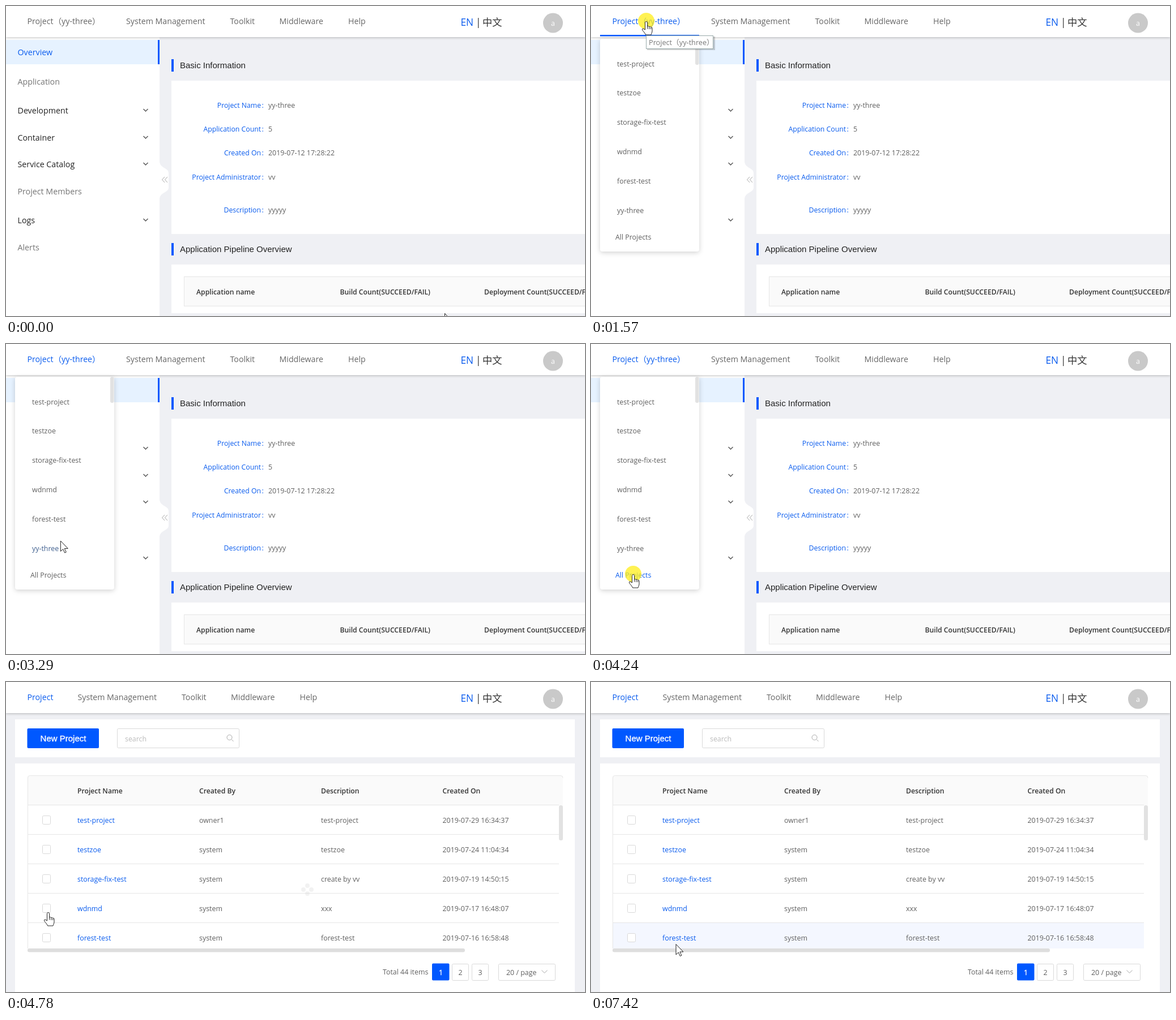
Recreate the animation shown at these times as an HTML page. Size 1022 px wide and 548 px high, loop 7520 ms.

```html
<!DOCTYPE html>
<html lang="en">
<head>
<meta charset="utf-8">
<title>Project console</title>
<style>
html, body { margin: 0; width: 100%; height: 100%; overflow: hidden; background: #eff0f4; }
svg { display: block; width: 1022px; height: 548px; }
text { font: 12.4px "Open Sans", "Noto Sans CJK SC", "Noto Sans CJK", sans-serif; fill: #606060; white-space: pre; }
.nav { font-size: 14.2px; fill: #666; }
.side { font-size: 14.25px; fill: #222; }
.side.dim { fill: #757575; }
.title { font: 15px "Liberation Sans", Arial, sans-serif; fill: #222; }
.label { font-size: 12.25px; text-anchor: end; }
.head { font-size: 12.2px; font-weight: 600; fill: #333; }
.lang { font-size: 17.3px; fill: #333; }
.tip { font-size: 12.7px; fill: #777; }
.mid { text-anchor: middle; }
text.soft { fill: #bbb; }
text.white { fill: #fff; }
text.strong { stroke: #fff; stroke-width: .35; }
text.blue { fill: #0a5cee; }
text.warm { fill: #40608f; }
.line { fill: none; stroke: #e6e6e6; }
.icon { fill: none; stroke: #555; stroke-width: 1.4; }
.thin { fill: none; stroke: #aaa; }
.box { fill: #fff; stroke: #d9d9d9; }
#header { filter: drop-shadow(0 1px 2px rgba(0, 0, 0, .25)); }
#menu { filter: drop-shadow(0 2px 4px rgba(0, 0, 0, .18)); }
</style>
</head>
<body>
<svg id="stage" viewBox="0 0 1022 548"></svg>
<script>
const LOOP = 7520;
const BLUE = '#0058ff';

const text = (x, y, str, cls = '', id = '') =>
  `<text x="${x}" y="${y}" class="${cls}"${id && ` id="${id}"`}>${str}</text>`;
const rect = (x, y, w, h, fill, more = '') =>
  `<rect x="${x}" y="${y}" width="${w}" height="${h}" fill="${fill}" ${more}/>`;
const box = (x, y, w, h, r = 2) =>
  `<rect x="${x + .5}" y="${y + .5}" width="${w - 1}" height="${h - 1}" rx="${r}" class="box"/>`;
const path = (d, cls, more = '') => `<path d="${d}" class="${cls}" ${more}/>`;
const group = (id, ...parts) => `<g id="${id}">${parts.join('')}</g>`;

const projects = ['test-project', 'testzoe', 'storage-fix-test', 'wdnmd', 'forest-test'];

function overviewPage() {
  const sideItems = [
    ['Overview', 87, 'blue'], ['Application', 139, 'dim'], ['Development', 190], ['Container', 238],
    ['Service Catalog', 285], ['Project Members', 333, 'dim'], ['Logs', 384], ['Alerts', 432, 'dim']
  ];
  const fields = [
    ['Project Name', 'yy-three', 180], ['Application Count', '5', 222], ['Created On', '2019-07-12 17:28:22', 264],
    ['Project Administrator', 'vv', 307], ['Description', 'yyyyy', 365]
  ];
  const section = (y, name) => rect(292, y, 4, 22, BLUE) + text(307, y + 15.5, name, 'title');
  return group('overview',
    rect(0, 55, 271, 493, '#fff'),
    path('M271 275c1 12 16 11 16 20v26c0 9 -15 8 -16 20z', '', 'fill="#fff"'),
    path('M280 302l-4.5 5 4.5 5M285 302l-4.5 5 4.5 5', 'thin'),
    rect(0, 60, 268, 43, '#e6f2ff'), rect(268, 60, 3, 43, BLUE),
    ...sideItems.map(([name, y, cls = '']) =>
      text(20.5, y, name, 'side ' + cls, name) +
      (cls ? '' : path(`M242.5 ${y - 8}l4 4 4-4`, 'icon'))),
    section(94, 'Basic Information'), section(419, 'Application Pipeline Overview'),
    rect(292, 132, 730, 271, '#fff'), rect(292, 457, 730, 86, '#fff'),
    ...fields.map(([name, value, y]) =>
      text(450, y, name, 'label blue') + text(451.5, y, ':', 'blue') + text(463, y, value)),
    rect(314.5, 478.5, 720, 52, '#fafafa', 'stroke="#e6e6e6"'),
    text(336, 510, 'Application name', 'head'),
    text(589.5, 510, 'Build Count(SUCCEED/FAIL)', 'head'),
    text(844, 510, 'Deployment Count(SUCCEED/FAIL)', 'head'));
}

function listPage() {
  const columns = [126, 341, 556, 770.5];
  const details = [
    ['owner1', 'test-project', '2019-07-29 16:34:37'], ['system', 'testzoe', '2019-07-24 11:04:34'],
    ['system', 'create by vv', '2019-07-19 14:50:15'], ['system', 'xxx', '2019-07-17 16:48:07'],
    ['system', 'forest-test', '2019-07-16 16:58:48']
  ];
  const dots = [[0, -7], [7, 0], [0, 7], [-7, 0]]
    .map(([x, y]) => `<circle cx="${532 + x}" cy="${367 + y}" r="4" fill="#ccc"/>`);
  const rows = details.map((cells, i) => {
    const y = 218 + 52 * i;
    return rect(39, y, 937, i < 4 ? 51 : 53, '#f4f7ff', 'class="hover"') +
      (i < 4 ? path(`M38 ${y + 51.5}H976`, 'line') : '') + box(64, y + 18, 15, 16) +
      [projects[i], ...cells].map((c, j) => text(columns[j], y + 30.5, c, j ? '' : 'blue')).join('');
  });
  return group('list',
    rect(16, 66, 988, 67, '#fff'), rect(16, 144, 988, 404, '#fff'),
    rect(37.5, 82, 126.5, 35, BLUE, 'rx="2"'), text(101, 105, 'New Project', 'title white strong mid'),
    box(196, 82, 216, 35), text(210, 105, 'search', 'soft'),
    path('M399 98a4.5 4.5 0 1 0 -9 0a4.5 4.5 0 1 0 9 0M398 101.5l3.5 3.5', 'thin'),
    rect(38, 166, 945, 52, '#fafafa'),
    path('M38.5 471V170q0-4.5 4-4.5H979q4 0 4 4M38 217.5H976', 'line'),
    ...['Project Name', 'Created By', 'Description', 'Created On'].map((h, i) => text(columns[i], 196.5, h, 'head')),
    group('rows', ...rows,
      rect(16, 471, 988, 77, '#fff'),
      rect(38, 471, 772, 6.5, '#dedede', 'rx="3"'), rect(976, 218, 7, 62, '#e2e2e2', 'rx="3"'),
      text(665, 516.5, 'Total 44 items'),
      rect(752, 497.5, 30.5, 30, BLUE, 'rx="2"'), text(767.5, 517.5, '1', 'white strong mid'),
      box(787, 498, 30, 30), text(802, 517.5, '2', 'mid'),
      box(822, 498, 30, 30), text(837, 517.5, '3', 'mid'),
      box(869, 498, 101, 30), text(883, 518, '20 / page'),
      path('M945.5 509.5l5 5 5-5', 'thin')),
    group('spinner', ...dots));
}

function header() {
  const items = [['System Management', 212], ['Toolkit', 395.5], ['Middleware', 482.5], ['Help', 604]];
  return group('header', rect(0, -5, 1022, 60, '#fff')) +
    text(37.5, 32, 'Project', 'nav', 'project') + text(83.9, 32, '（yy-three）', 'nav', 'current') +
    group('navRest', ...items.map(([name, x]) => text(x, 32, name, 'nav'))) +
    rect(16, 51, 175, 2.5, BLUE, 'id="underline"') +
    text(802.5, 34.5, 'EN', 'lang blue') + text(829, 34.5, '|', 'lang') + text(841, 35, '中文', 'lang') +
    '<circle cx="965.5" cy="30" r="17.5" fill="#c9c9c9"/>' + text(965.5, 35, 'a', 'white mid');
}

const menu = () => group('menu',
  rect(16, 58, 175, 376, '#fff', 'rx="4"'), rect(184, 58, 6.5, 46, '#e2e2e2', 'rx="3"'),
  ...[...projects, 'yy-three'].map((p, i) => text(46, 106.5 + 51.8 * i, p, 'item')),
  text(43, 413, 'All Projects', '', 'all'));

const overlays = () =>
  group('tooltip', rect(99, 54, 120, 24, '#000', 'opacity=".18"'),
    rect(97.5, 52.5, 118, 23, '#fff', 'stroke="#9aa"'), text(102, 68.5, 'Project（yy-three）', 'tip')) +
  '<circle id="click" r="14.5" fill="#ffee1a"/>' +
  '<g id="cursor" fill="#fff" stroke="#222" stroke-linejoin="round">' +
  path('M.5 .5V19l4.3-4 3 6.6 2.6-1.2-3-6.4h6z', '', 'id="arrow"') +
  path('M-2 15V2.5a2 2 0 0 1 4 0V9.5c.6-1.2 3-1.2 3.2.4c.7-1 2.8-.8 3 .7c.8-.7 2.3-.2 2.3 1.4V17c0 3-1.5 4.5-2 7H-1c-.4-2.4-4-5.5-5.8-8.6c-1-2 1-3.2 2.4-2zM2 9.5v4M5.2 10v4M8.2 11v3', '', 'id="hand"') +
  '</g>';

const $ = id => document.getElementById(id);
$('stage').innerHTML = overviewPage() + listPage() + header() + menu() + overlays();
const menuItems = document.querySelectorAll('.item');
const rowHovers = document.querySelectorAll('.hover');

// Each move: start, end, steps, control point, end point.
const moves = [
  [70, 770, 10, 380, 262, 110, 58],
  [850, 1240, 6, 103, 38, 97.5, 27],
  [2170, 2880, 10, 141, 199, 117, 283],
  [2970, 3680, 10, 96, 350, 74.5, 407],
  [5250, 5710, 7, 118, 312, 142, 228],
  [5880, 6570, 10, 149, 295, 150, 362],
  [6640, 7200, 8, 150, 412, 149.5, 463]
];

function cursorAt(t) {
  let pos = [774, 543];
  for (const [start, end, steps, cx, cy, x, y] of moves) {
    if (t < start) break;
    const step = Math.floor((t - start) / (end - start) * (steps - 1) + .08) + 1;
    const p = Math.min(1, step / steps), q = 1 - p;
    const mix = (a, c, b) => q * q * a + 2 * q * p * c + p * p * b;
    pos = [mix(pos[0], cx, x), mix(pos[1], cy, y)];
  }
  return pos;
}

const show = (el, value) => { el.style.opacity = +value; };
const within = (t, a, b) => t >= a && t < b;
const ramp = (t, a, b) => Math.max(0, Math.min(1, (t - a) / (b - a)));

function draw(t) {
  const [x, y] = cursorAt(t);
  const onList = t >= 4550;
  const menuOpen = within(t, 930, 4550);

  $('overview').style.display = onList ? 'none' : '';
  $('list').style.display = onList ? '' : 'none';
  $('current').style.display = onList ? 'none' : '';
  $('navRest').setAttribute('transform', `translate(${onList ? -85.5 : 0})`);
  $('project').classList.toggle('blue', t >= 850);
  $('current').classList.toggle('blue', t >= 850);
  $('Application').classList.toggle('blue', within(t, 610, 770));

  show($('underline'), within(t, 850, 2250));
  show($('menu'), menuOpen ? ramp(t, 930, 1150) * (1 - ramp(t, 4470, 4560)) : 0);
  show($('tooltip'), within(t, 1570, 1710));
  show($('click'), within(t, 1470, 1710) || within(t, 4240, 4470) ? .75 : 0);
  $('click').setAttribute('transform', `translate(${x} ${y - .5})`);

  const overItem = within(t, 2250, 3680) ? Math.floor((y - 80) / 52) : -1;
  menuItems.forEach((el, i) => el.classList.toggle('warm', i === overItem));
  const overAll = within(y, 396, 425) && within(t, 2970, 4550);
  $('all').classList.toggle('blue', overAll);

  const overRow = t >= 4870 ? Math.floor((cursorAt(t - 60)[1] - 218) / 52) : -1;
  rowHovers.forEach((el, i) => show(el, i === overRow));
  show($('rows'), t >= 4700);
  show($('spinner'), t < 4700 ? .8 : .25 * (1 - ramp(t, 4780, 5020)));

  const overLink = t > 5250 && x >= 126 && Math.abs((y - 218) % 52 - 26) < 9;
  const hand = within(t, 850, 2250) || overAll || within(t, 4470, 5250) || overLink;
  show($('hand'), hand);
  show($('arrow'), !hand);
  $('cursor').setAttribute('transform', `translate(${x} ${y})`);
}

const origin = performance.now();
(function tick() {
  draw((performance.now() - origin) % LOOP);
  requestAnimationFrame(tick);
})();
</script>
</body>
</html>
```
